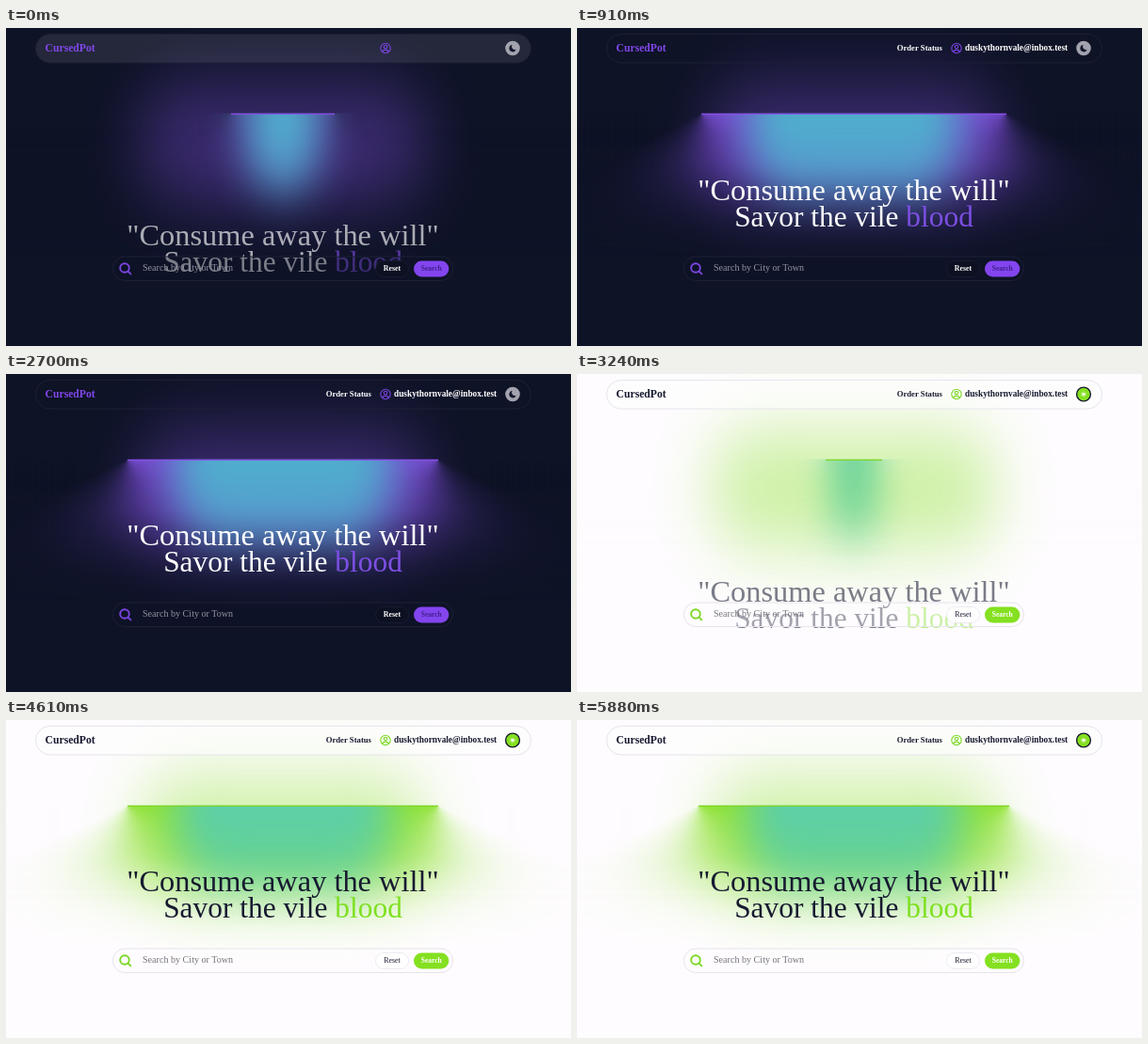
Animation of 600 by 338 pixels, one loop 5.91 s. Source, as an HTML page:

```html
<!DOCTYPE html>
<html lang="en">
<head>
<meta charset="utf-8">
<title>Lamp hero</title>
<style>
  html, body { margin: 0; width: 100%; height: 100%; overflow: hidden; }
  #stage {
    --bg: #0e1326; --accent: #8150e0; --orb: #36ddc3; --line: #8a50ea; --ink: #fff;
    --brand: #8047e8; --blood: #7d4fe3; --edge: #1d2036; --hint: #9293a0;
    --pill: #0c1021; --button: #8345ee; --button-ink: #43208f; --icon: #7b45e0;
    position: relative; width: 600px; height: 338px; overflow: hidden; background: var(--bg);
  }
  #stage.light {
    --bg: #fefcfe; --accent: #84e01c; --orb: #4bc6ee; --line: #7cd622; --ink: #171a30;
    --brand: #171a30; --blood: #7fe022; --edge: #e6e4ec; --hint: #74757e;
    --pill: #fff; --button: #84e020; --button-ink: #fff; --icon: #7bd824;
  }

  /* The lamp is laid out in plain units, then stretched vertically about its middle. */
  #lamp { position: absolute; inset: 0; transform-origin: 0 187px; transform: scaleY(1.25); }
  #lamp div { position: absolute; }
  .cone { top: 110px; height: 154px; overflow: hidden; }
  #coneL { right: 306px; background: conic-gradient(from 70deg at center top, var(--accent), transparent 50%, transparent); }
  #coneR { left: 294px; background: conic-gradient(from 290deg at center top, transparent, transparent 50%, var(--accent)); }
  .fade { background: var(--bg); bottom: 0; }
  .under { left: 0; width: 100%; height: 110px; -webkit-mask-image: linear-gradient(to top, #fff, transparent); mask-image: linear-gradient(to top, #fff, transparent); }
  .side { width: 110px; height: 100%; }
  #coneL .side { left: 0; -webkit-mask-image: linear-gradient(to right, #fff, transparent); mask-image: linear-gradient(to right, #fff, transparent); }
  #coneR .side { right: 0; -webkit-mask-image: linear-gradient(to left, #fff, transparent); mask-image: linear-gradient(to left, #fff, transparent); }
  #floor { left: -156px; width: 900px; top: 184px; height: 168px; background: var(--bg); filter: blur(26px); }
  #orb { top: 71.5px; height: 99px; border-radius: 50px; background: var(--orb); filter: blur(21px); }
  #cover { left: 0; width: 600px; top: -12px; height: 122px; background: var(--bg); }
  #halo { left: 140px; width: 308px; top: 86px; height: 99px; border-radius: 50px; background: var(--accent); opacity: .4; filter: blur(31px); }
  #line { top: 109.7px; height: 1.4px; background: var(--line); }

  svg { position: absolute; left: 0; top: 0; }
  text { font-family: "Liberation Serif", "Noto Serif", serif; fill: var(--ink); }
  .bold { font-weight: 700; }
  .outline { fill: none; stroke: var(--edge); }
  .icon { fill: none; stroke: var(--icon); stroke-linecap: round; }
  .sun, .light .moon { display: none; }
  .light .sun { display: inline; }
  .light .plain { font-weight: 400; }
</style>
</head>
<body>
<div id="stage">
  <div id="lamp">
    <div id="coneL" class="cone"><div class="fade under"></div><div class="fade side"></div></div>
    <div id="coneR" class="cone"><div class="fade under"></div><div class="fade side"></div></div>
    <div id="floor"></div>
    <div id="orb"></div>
    <div id="cover"></div>
    <div id="halo"></div>
    <div id="line"></div>
  </div>
  <svg width="600" height="338" viewBox="0 0 600 338">
    <g id="headline" text-anchor="middle">
      <text x="294" y="182" font-size="32.4">"Consume away the will"</text>
      <text x="294" y="210" font-size="31.4">Savor the vile <tspan fill="var(--blood)" style="fill:var(--blood)">blood</tspan></text>
    </g>

    <rect id="bar" x="31.5" y="6.5" width="526" height="30.5" rx="15.2" class="outline"/>
    <text x="41.5" y="25" font-size="11.7" class="bold" style="fill:var(--brand)">CursedPot</text>
    <g id="links" class="bold">
      <text x="388" y="24.2" font-size="8.7" text-anchor="end">Order Status</text>
      <text x="412" y="24.2" font-size="9.3">duskythornvale@inbox.test</text>
    </g>
    <g class="icon" stroke-width="1.1">
      <circle cx="403" cy="21.5" r="5.2"/>
      <circle cx="403" cy="20" r="1.8"/>
      <path d="M399.7 25.3q.6-2.2 3.3-2.2t3.3 2.2"/>
    </g>
    <g class="moon">
      <circle cx="538" cy="21.5" r="7.8" fill="#a3a3af"/>
      <path d="M537.6 18a3.7 3.7 0 1 0 4 4.7a3.2 3.2 0 0 1-4-4.7z" fill="#14172b"/>
    </g>
    <g class="sun">
      <circle cx="538" cy="21.5" r="7.4" fill="#84e020" stroke="#171a30" stroke-width="1.4"/>
      <circle cx="538" cy="21.5" r="1.7" fill="#fff"/>
      <circle cx="538" cy="21.5" r="2.6" fill="none" stroke="#fff" stroke-width=".7" stroke-dasharray=".8 1.24"/>
    </g>

    <rect x="113.5" y="243" width="361" height="25.5" rx="12.7" fill="var(--bg)" fill-opacity=".3" stroke="var(--edge)"/>
    <g class="icon" stroke-width="1.9">
      <circle cx="126" cy="255" r="4.8"/>
      <path d="M129.6 258.6l2.8 2.8"/>
    </g>
    <text x="145" y="258.3" font-size="10.1" style="fill:var(--hint)">Search by City or Town</text>
    <rect x="392.5" y="247.5" width="35" height="17" rx="8.5" fill="var(--pill)" stroke="var(--edge)" stroke-width=".7"/>
    <text x="410" y="257.7" font-size="7.9" text-anchor="middle" class="bold plain">Reset</text>
    <rect x="433" y="247.5" width="37.3" height="17" rx="8.5" fill="var(--button)"/>
    <text x="451.8" y="257.7" font-size="7.5" text-anchor="middle" class="bold" style="fill:var(--button-ink)">Search</text>
  </svg>
</div>
<script>
  const LOOP = 5910, SWITCH = 2750, CENTER = 294;
  const DARK = { start: -640, duration: 1730 };
  const LIGHT = { start: 3046, duration: 800 };

  const $ = id => document.getElementById(id);
  const clamp = x => Math.min(1, Math.max(0, x));
  const mix = (a, b, k) => a + (b - a) * k;

  // cubic-bezier(.42, 0, .58, 1)
  function easeInOut(x) {
    let lo = 0, hi = 1;
    for (let i = 0; i < 24; i++) {
      const s = (lo + hi) / 2, r = 1 - s;
      if (1.26 * s * r * r + 1.74 * s * s * r + s * s * s < x) lo = s; else hi = s;
    }
    return lo * lo * (3 - 2 * lo);
  }

  function setCentered(el, width) {
    el.style.width = width + 'px';
    el.style.left = CENTER - width / 2 + 'px';
  }

  function render(t) {
    const light = t >= SWITCH;
    const { start, duration } = light ? LIGHT : DARK;
    const p = easeInOut(clamp((t - start) / duration));
    const width = mix(22, 330, p);
    const opacity = mix(.5, 1, p);

    $('stage').classList.toggle('light', light);
    for (const id of ['coneL', 'coneR']) {
      $(id).style.width = width + 'px';
      $(id).style.opacity = opacity;
    }
    setCentered($('line'), width);
    setCentered($('orb'), width * .7);
    $('headline').setAttribute('transform', `translate(0 ${mix(68.75, 0, p)})`);
    $('headline').setAttribute('opacity', opacity);

    // The bar settles shortly after the theme turns dark.
    const settle = light ? 1 : clamp(t / 280);
    $('bar').style.fill = `rgba(255,255,255,${light ? .5 : .09 * (1 - settle)})`;
    $('links').setAttribute('opacity', settle);
  }

  function tick() {
    render(performance.now() % LOOP);
    requestAnimationFrame(tick);
  }
  tick();
</script>
</body>
</html>
```
